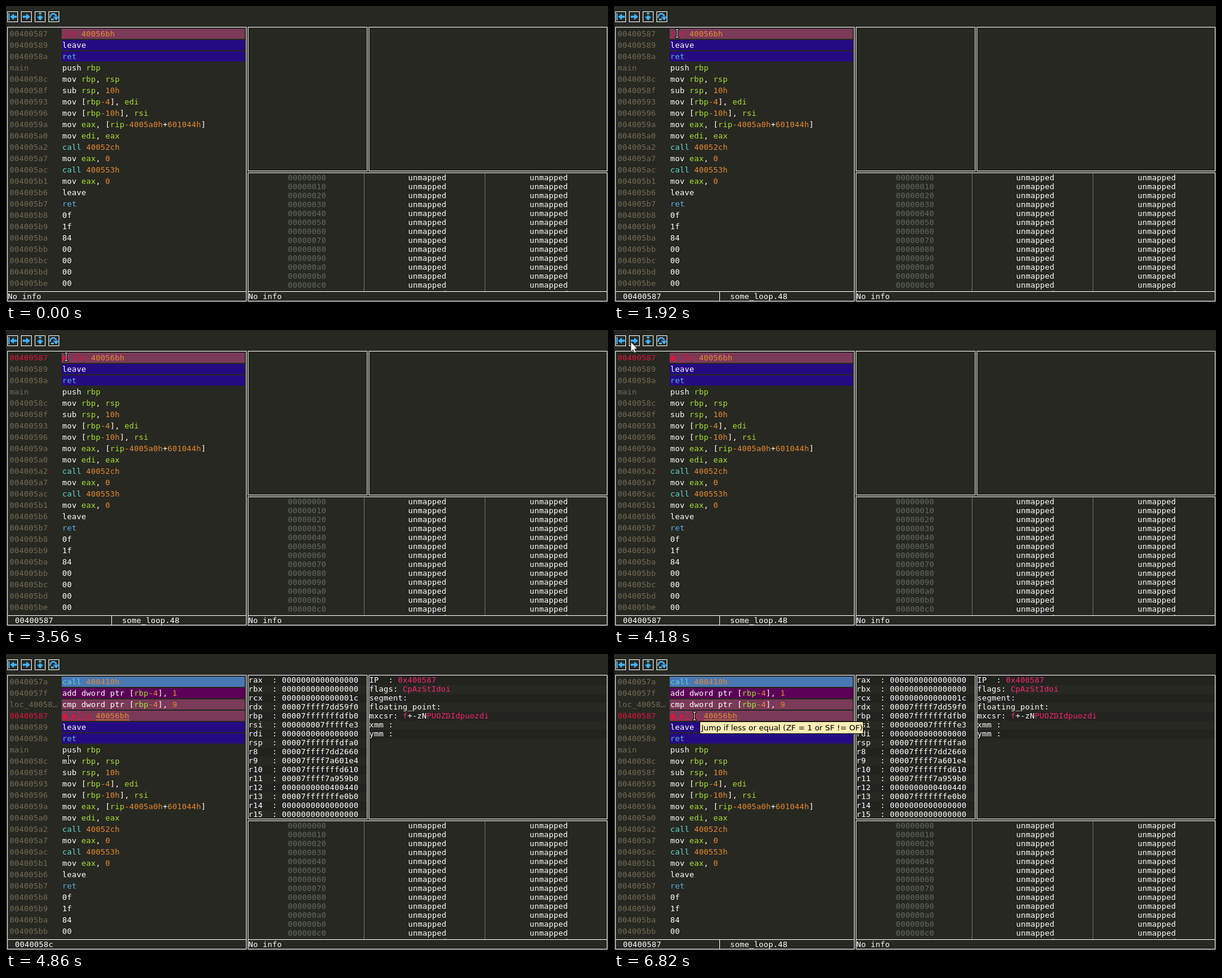
Write an HTML page with a canvas that moves like this. It is 1006 by 496 pixels and loops after 8000 ms.

```html
<!DOCTYPE html>
<html>
<head>
<meta charset="utf-8">
<style>
  html, body { margin: 0; width: 100%; height: 100%; overflow: hidden; background: #272822; }
  canvas { display: block; }
</style>
</head>
<body>
<canvas id="stage" width="1006" height="496"></canvas>
<script>
const ctx = document.getElementById('stage').getContext('2d');
const BG = '#272822', WHITE = '#fff', ADDR = '#746a56', PINK = '#f92672', RED = '#e0143f';
const ORANGE = '#e6892e', GREEN = '#a6e22e';
const LOOP = 8000, TIP = 'Jump if less or equal (ZF = 1 or SF != OF)';

// address | instruction | row background
const code = `0040057a|call 400410h|#4878b4
0040057f|add dword ptr [rbp-4], 1|#5c0057
loc_40058…|cmp dword ptr [rbp-4], 9|#7a3a58
00400587|jle 40056bh|#7a3a58
00400589|leave|#250b82
0040058a|ret|#250b82
main|push rbp
0040058c|mov rbp, rsp
0040058f|sub rsp, 10h
00400593|mov [rbp-4], edi
00400596|mov [rbp-10h], rsi
0040059a|mov eax, [rip-4005a0h+601044h]
004005a0|mov edi, eax
004005a2|call 40052ch
004005a7|mov eax, 0
004005ac|call 400553h
004005b1|mov eax, 0
004005b6|leave
004005b7|ret
004005b8|0f
004005b9|1f
004005ba|84
004005bb|00
004005bc|00
004005bd|00
004005be|00`.split('\n').map(line => line.split('|'));
const labels = { main: '0040058b', 'loc_40058…': '00400583' };
const blocks = { '00400587': 'some_loop.48', '00400589': 'some_loop.53', '0040058a': 'some_loop.54' };
const mnemonics = { call: '#5fd7cf', ret: '#5ab0e6', jle: RED };

const registers = `rax 0,rbx 0,rcx 1c,rdx 7ffff7dd59f0,rbp 7fffffffdfb0,rsi 7fffffe3,rdi 0,rsp 7fffffffdfa0,
r8 7ffff7dd2660,r9 7ffff7a601e4,r10 7fffffffd610,r11 7ffff7a959b0,r12 400440,r13 7fffffffe0b0,r14 0,r15 0`
  .split(/,\s*/).map(s => s.split(' '));
const flags = [['IP  : ', '0x400587'], ['flags: ', 'CpAzStIdoi'], ['segment:'], ['floating_point:'],
  ['mxcsr: ', 'f', '+-zN', 'PUOZDIdpuozdi'], ['xmm :'], ['ymm :']];

// pointer path: time, x, y
const path = [[470, 140, 16], [700, 128, 50], [900, 112, 54], [1070, 105, 46], [1625, 105, 46], [1630, 105, 46],
  [2370, 105, 47], [2490, 128, 72], [2650, 156, 94], [2860, 156, 95], [2980, 158, 109], [3120, 165, 124],
  [3260, 165, 124], [3440, 132, 84], [3560, 101, 46], [3640, 52, 5], [3740, 44, 1], [3960, 30, 19],
  [4140, 30, 19], [4220, 27, 20], [4360, 27, 20], [4540, 111, 121], [4760, 118, 178], [5000, 84, 176],
  [5150, 73, 158], [5230, 71, 146], [5480, 71, 146], [5710, 139, 133], [5900, 137, 114], [6150, 135, 104],
  [6290, 135, 104], [6330, 134, 104]];

function pointer(t) {
  const i = path.findIndex(p => p[0] > t);
  if (i < 0) return path[path.length - 1].slice(1);
  const [t0, x0, y0] = path[i - 1], [t1, x1, y1] = path[i], k = (t - t0) / (t1 - t0);
  return [Math.round(x0 + (x1 - x0) * k), Math.round(y0 + (y1 - y0) * k)];
}

function box(x, y, w, h, fill) {
  ctx.fillStyle = fill;
  ctx.fillRect(x, y, w, h);
}

function frame(x, y, w, h, color = WHITE, width = 1) {
  ctx.strokeStyle = color;
  ctx.lineWidth = width;
  ctx.strokeRect(x, y, w, h);
}

// monospaced text on a whole-pixel cell grid; returns the end x
function text(str, x, y, color = WHITE, size = 13, cell = 8) {
  ctx.font = size + 'px "DejaVu Sans Mono", monospace';
  ctx.fillStyle = color;
  for (const ch of str) {
    if (ch !== ' ') ctx.fillText(ch, x, y);
    x += cell;
  }
  return x;
}

function instruction(str, x, y, underline) {
  const [, first, rest] = str.match(/^(\S+)(.*)$/);
  const put = (s, color) => {
    if (underline) box(x, y + 2, s.length * 8, 1, color);
    x = text(s, x, y, color);
  };
  const prefix = first.match(/^[■▶ ]+/);
  put(first, prefix ? RED : mnemonics[first] || WHITE);
  for (const part of rest.split(/(\b[re](?:[abcd]x|[sd]i|[sb]p|ip)\b|-?\b\d[0-9a-f]*h?\b)/)) {
    if (!part) continue;
    put(part, /^-?\d/.test(part) ? ORANGE : /^[re]\w\w$/.test(part) ? GREEN : part.includes('jle') ? RED : WHITE);
  }
}

function shape(points, fill, stroke) {
  ctx.beginPath();
  points.forEach(([x, y]) => ctx.lineTo(x, y));
  ctx.closePath();
  if (stroke) { ctx.strokeStyle = stroke; ctx.lineWidth = 1; ctx.stroke(); }
  ctx.fillStyle = fill;
  ctx.fill();
}

function at(x, y, angle, draw) {
  ctx.save();
  ctx.translate(x, y);
  ctx.rotate(angle);
  draw();
  ctx.restore();
}

function toolbar() {
  const blue = '#45b3f3', edge = '#1d6fb0';
  const arrow = tail => () => shape([[tail, -1.5], [0, -1.5], [0, -5], [6, 0], [0, 5], [0, 1.5], [tail, 1.5]], blue, edge);
  for (let i = 0; i < 4; i++) frame(2.5 + 23 * i, 9.5, 17, 17);
  box(4, 12, 2, 12, blue);
  at(13, 18, Math.PI, arrow(-5));
  at(34, 18, 0, arrow(-6));
  at(57, 18, Math.PI / 2, arrow(-2));
  box(55, 11, 4, 3, blue);
  ctx.strokeStyle = blue;
  ctx.lineWidth = 2.5;
  ctx.beginPath();
  ctx.arc(79, 18, 5, Math.PI * 0.9, Math.PI * 1.95);
  ctx.stroke();
  shape([[79, 18], [88, 18], [84, 24]], blue, edge);
  box(75, 21, 5, 3, blue);
}

function codePane(first, marked, stopped) {
  for (let i = 0; i < 23; i++) {
    const [addr, ins, fill] = code[first + i], y = 51 + 19 * i, current = addr === '00400587';
    if (fill) box(93, y - 13, 306, 17, fill);
    text(addr, 6, y, current && marked ? RED : ADDR);
    instruction(rowText(first + i, marked, stopped), 94, y, current && stopped);
  }
}

function rowText(i, marked, stopped) {
  return (i === 3 && marked ? stopped ? '■ ▶' : '■ ' : '') + code[i][1];
}

function registerPanes() {
  const band = (x, w, i) => i % 2 || box(x, 37 + 15 * i, w, 15, '#22231e');
  registers.forEach(([name, value], i) => {
    band(405, 198, i);
    text(name.padEnd(5) + ': ' + value.padStart(16, '0'), 405, 48 + 15 * i);
  });
  flags.forEach((parts, i) => {
    band(607, 397, i);
    parts.reduce((x, s, k) => text(s, x, 48 + 15 * i, k % 2 ? PINK : WHITE), 607);
  });
}

function memoryPane() {
  ctx.save();
  ctx.beginPath();
  ctx.rect(405, 280, 600, 198);
  ctx.clip();
  for (let i = 0; i < 14; i++) {
    const y = 292 + 15 * i;
    text((i * 16).toString(16).padStart(8, '0'), 471, y, '#626b60');
    text('unmapped', 672, y);
    text('unmapped', 875, y);
  }
  box(598, 280, 1, 198, '#75715e');
  box(800, 280, 1, 198, '#75715e');
  ctx.restore();
}

function gradient(y0, y1, a, b) {
  const g = ctx.createLinearGradient(0, y0, 0, y1);
  g.addColorStop(0, a);
  g.addColorStop(1, b);
  return g;
}

function menu(hover) {
  box(108, 45, 160, 117, '#9a9a9a');
  box(109, 46, 158, 115, '#f0f0f0');
  box(111, 48, 154, 19, gradient(48, 67, '#555a5a', '#080808'));
  text('title', 114, 61, WHITE, 11, 7);
  box(137, 68, 1, 91, '#e2e3e3');
  ['leave', 'enter', 'add breakpoint', 'delete breakpoint'].forEach((item, i) => {
    const y = 67 + 23 * i;
    if (i === hover) {
      box(111, y + 23 - 23, 154, 23, gradient(y, y + 23, '#f4f4fb', '#dde7f1'));
      frame(111.5, y + 0.5, 153, 22, '#aecff7');
    }
    text(item, 141, y + 15, '#000', 11, 7);
  });
}

function tooltip(x, y) {
  box(x, y, 274, 21, '#000');
  box(x + 1, y + 1, 272, 19, '#fbedb4');
  ctx.font = '13px "DejaVu Sans", sans-serif';
  ctx.fillStyle = '#000';
  ctx.fillText(TIP, x + 3, y + 15);
}

function arrowCursor() {
  shape([[0.5, 0.5], [0.5, 15.5], [4, 12.5], [6.5, 18], [8.5, 17], [6, 11.5], [10.5, 11.5]], WHITE, '#000');
}

function textCursor() {
  box(-3, -8, 7, 3, '#000');
  box(-3, 5, 7, 3, '#000');
  box(-1, -8, 3, 16, '#000');
  box(-2, -7, 5, 1, WHITE);
  box(-2, 6, 5, 1, WHITE);
  box(0, -7, 1, 14, WHITE);
}

function draw(t) {
  const visible = t >= 470, menuOpen = t >= 1970 && t < 3200;
  const marked = t >= 3200, stopped = t >= 4600, first = stopped ? 0 : 3;
  const [x, y] = visible ? pointer(t) : [0, 0];
  const row = menuOpen ? 0 : Math.max(0, Math.min(22, Math.floor((y - 37) / 19)));
  const label = code[first + row][0], addr = labels[label] || label;

  box(0, 0, 1006, 496, BG);
  toolbar();
  codePane(first, marked, stopped);
  if (t >= 4440) registerPanes();
  memoryPane();

  frame(2.5, 478.5, 399, 16);
  frame(2.5, 35.5, 399, 443);
  if (menuOpen) frame(2, 35, 400, 444, '#e6b84c', 2);
  frame(404.5, 35.5, 199, 241);
  frame(606.5, 35.5, 398, 241);
  frame(404.5, 279.5, 600, 199);
  frame(404.5, 478.5, 600, 16);

  text('No info', 405, 491);
  if (t < 620) text('No info', 3, 491);
  else {
    text(addr, 15, 491);
    if (blocks[addr]) {
      box(176, 479, 1, 15, WHITE);
      text(blocks[addr], 194, 491);
    }
  }

  if (menuOpen) menu(x >= 109 ? Math.floor((y - 67) / 23) : -1);
  if (t >= 1540 && t < 1920) tooltip(114, 55);
  if (t >= 6820) tooltip(143, 113);

  if (visible) {
    const end = 94 + 8 * rowText(first + row, marked, stopped).length;
    const overText = y >= 37 && (x < 70 || (x >= 93 && x < end)) && !(menuOpen && x >= 109);
    at(x, y, 0, overText ? textCursor : arrowCursor);
  }
}

const start = performance.now();
function tick() {
  draw((performance.now() - start) % LOOP);
  requestAnimationFrame(tick);
}
tick();
</script>
</body>
</html>
```
